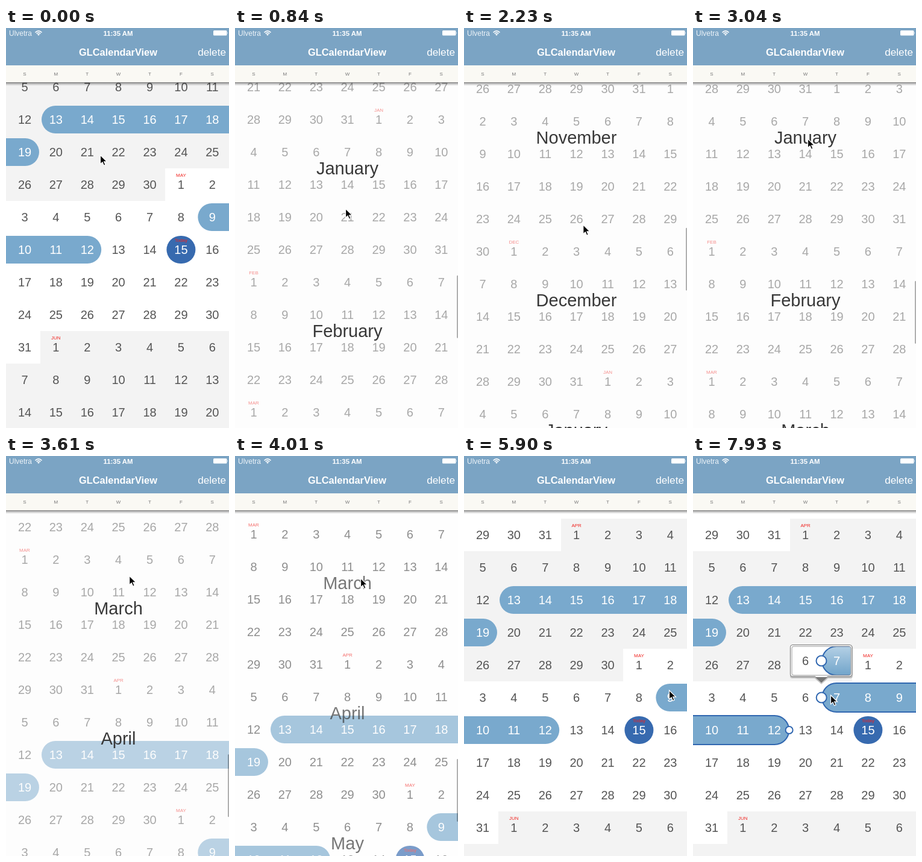
Animation, 370 px wide and 664 px high, one loop 7990 ms. Source, as an HTML page:

```html
<!DOCTYPE html>
<html lang="en">
<head>
<meta charset="utf-8">
<title>Calendar</title>
<style>
html, body { margin: 0; height: 100%; overflow: hidden; background: #fff; }
svg { display: block; width: 370px; height: 664px; font-family: "Liberation Sans", Arial, sans-serif; }
text { white-space: pre; }
.mid { text-anchor: middle; }
.num { font-size: 20px; fill: #555; }
.lit { fill: #fff; }
.tag { font-size: 8px; fill: #f0231f; }
.month { font-size: 29px; fill: #383838; }
.pill { fill: #79a9cd; }
.edit { fill: #79a9cd; stroke: #3067b0; stroke-width: 2; }
.knob { fill: #fff; stroke: #3067b0; stroke-width: 2; }
</style>
</head>
<body>
<svg viewBox="0 0 370 664" xmlns="http://www.w3.org/2000/svg">
  <defs>
    <linearGradient id="shade" x2="0" y2="1">
      <stop offset="0" stop-color="#000" stop-opacity=".5"/>
      <stop offset=".4" stop-color="#000" stop-opacity=".24"/>
      <stop offset="1" stop-color="#000" stop-opacity="0"/>
    </linearGradient>
    <linearGradient id="glass" x2="0" y2="1">
      <stop offset="0" stop-color="#b4d0e5"/>
      <stop offset="1" stop-color="#71a4ca"/>
    </linearGradient>
    <clipPath id="lens"><rect x="-49" y="-24" width="98" height="48" rx="3"/></clipPath>
  </defs>
  <rect width="370" height="664" fill="#fff"/>
  <g id="grid">
    <g id="tint" fill="#f3f3f3" shape-rendering="crispEdges"></g>
    <g id="bars"></g>
    <g id="days"></g>
  </g>
  <rect id="veil" y="90" width="370" height="574" fill="#fcfcfc"/>
  <g id="months"></g>
  <rect id="thumb" x="368" width="2.5" height="104" rx="1.2" fill="#000"/>
  <g id="knobs">
    <circle id="head" class="knob" cy="401"/>
    <circle class="knob" cx="159.6" cy="455" r="6"/>
  </g>
  <g id="loupe">
    <path d="M-49 -25H49Q52 -25 52 -22V25Q52 29 48 29H11L0 39L-11 29H-48Q-52 29 -52 25V-22Q-52 -25 -49 -25Z" fill="#000" opacity=".22"/>
    <path d="M-48 -26.5H47Q51 -26.5 51 -22.5V22Q51 26 47 26H10.500L0 36L-10.500 26H-48Q-51.500 26 -51.500 22V-22.500Q-51.500 -26.500 -48 -26.500Z" fill="#fff" stroke="#777"/>
    <path d="M-10 27H10L0 36Z" fill="#777"/>
    <g clip-path="url(#lens)">
      <rect x="-49" y="-24" width="98" height="48" fill="#fff"/>
      <path d="M60 -24H25A24 24 0 0 0 25 24H60Z" fill="url(#glass)" stroke="#3067b0" stroke-width="2"/>
      <text id="before" class="mid num" x="-26.500" y="7"></text>
      <text id="after" class="mid num lit" x="25.500" y="7"></text>
      <circle class="knob" r="8.500"/>
    </g>
    <rect x="-49" y="-24" width="98" height="48" rx="3" fill="none" stroke="#999"/>
  </g>
  <rect y="90" width="370" height="6" fill="url(#shade)"/>
  <rect width="370" height="63" fill="#7ba4c4"/>
  <rect y="62" width="370" height="28" fill="#faf9f4"/>
  <g id="week" class="mid" font-size="8" fill="#777"></g>
  <g fill="#fff">
    <text x="5" y="13" font-size="12" fill="#edf3f8">Ulvetra</text>
    <g fill="none" stroke="#fff" stroke-width="1.700">
      <path d="M48.500 7.500Q54 2.300 59.500 7.500M50.600 9.500Q54 6.300 57.400 9.500"/>
    </g>
    <path d="M52 10.600Q54 9 56 10.600L54 12.800Z"/>
    <text class="mid" x="186" y="12.500" font-size="11.400" font-weight="bold">11:35 AM</text>
    <rect x="344" y="4" width="22.500" height="8.500" rx="1.500"/>
    <path d="M367.300 6.500Q369 8.200 367.300 10Z"/>
    <text class="mid" x="186" y="46" font-size="16.400" font-weight="bold">GLCalendarView</text>
    <text x="365" y="46" font-size="17.200" text-anchor="end">delete</text>
  </g>
  <path id="arrow" d="M0 0V15L3.500 11.800L6 17.300L8.500 16.200L6.200 10.900H11Z" fill="#000" stroke="#fff" stroke-width="1.200"/>
</svg>
<script>
const LOOP = 7990, ROW = 54, COL = 51.88, LEFT = 5.06;
const NAMES = ["January", "February", "March", "April", "May", "June", "July",
  "August", "September", "October", "November", "December"];
const $ = id => document.getElementById(id);

function add(parent, tag, attrs, text) {
  const el = document.createElementNS("http://www.w3.org/2000/svg", tag);
  for (const key in attrs) el.setAttribute(key, attrs[key]);
  if (text !== undefined) el.textContent = text;
  return parent.appendChild(el);
}
function set(el, attrs) {
  for (const key in attrs) el.setAttribute(key, attrs[key]);
}
const center = col => 31 + COL * col;
const edge = col => LEFT + COL * col;

// Grid space: y = 0 is the middle of the week of May 10, 2015.
const dayText = {}, labels = [];
function buildDays() {
  for (let row = -34; row <= 5; row++) {
    for (let col = 0; col < 7; col++) {
      const n = row * 7 + col;
      const date = new Date(2015, 4, 10 + n), month = date.getMonth(), day = date.getDate();
      const x = center(col), y = row * ROW;
      if (month % 2) {
        const a = col ? Math.round(edge(col)) : 0;
        const b = col < 6 ? Math.round(edge(col + 1)) : 370;
        add($("tint"), "rect", { x: a, y: y - 27, width: b - a, height: ROW });
      }
      const booked = n >= -27 && n <= -21 || n >= -1 && n <= 2;
      const today = n === 5;
      if (today) add($("bars"), "rect", { x: x - 24, y: y - 23, width: 48, height: 46, rx: 23, fill: "#376aaf" });
      dayText[n] = add($("days"), "text", { class: "mid num" + (booked || today ? " lit" : ""), x, y: y + 7 }, day);
      if (today) add($("days"), "text", { class: "mid tag lit", x, y: y - 13 }, "Today");
      if (day === 1) {
        add($("days"), "text", { class: "mid tag", x, y: y - 13 }, NAMES[month].slice(0, 3).toUpperCase());
        labels.push(add($("months"), "text", { class: "mid month", x: 186.5, y: y + 91 }, NAMES[month]));
      }
    }
  }
}

const headPath = (x, r, y) => `M380 ${y - r}H${x + r}A${r} ${r} 0 0 0 ${x + r} ${y + r}H380Z`;
const tailPath = (x, r, y) => `M-10 ${y - r}H${x - r}A${r} ${r} 0 0 1 ${x - r} ${y + r}H-10Z`;

buildDays();
add($("bars"), "path", { class: "pill", d: headPath(59, 23, -4 * ROW) });
add($("bars"), "path", { class: "pill", d: tailPath(55, 23, -3 * ROW) });
const first = add($("bars"), "path"), last = add($("bars"), "path");
[..."SMTWTFS"].forEach((c, i) => add($("week"), "text", { x: center(i), y: 79 }, c));

// [time, value]
const scroll = [[120, 368], [330, 460], [520, 800], [760, 1120], [1000, 1250], [1250, 1282],
  [1430, 1285], [1480, 1292], [1640, 1345], [1850, 1500], [2150, 1600], [2520, 1640],
  [2640, 1630], [2800, 1520], [3040, 1128], [3300, 850], [3600, 715], [3850, 672],
  [4010, 670], [4350, 670], [4450, 655], [4750, 576], [4850, 525], [5030, 455]];
const cover = [[120, 0], [420, 1], [1000, 1], [1280, 0], [1490, 0], [1750, 1], [3910, 1],
  [4225, 0], [4350, 0], [4620, 1], [5330, 1], [5620, 0]];
// [time, x, y]
const pointer = [[120, 156.5, 211], [330, 170, 300], [900, 185, 300], [1430, 198.5, 275],
  [1480, 198.5, 282], [1640, 200, 335], [2520, 196, 320], [2640, 195, 315], [2850, 191, 215],
  [3040, 190.5, 184], [3850, 208.5, 203], [4010, 208.5, 203], [4350, 209.5, 451],
  [4450, 209.5, 436], [4750, 209.5, 356], [4850, 209.5, 320], [5030, 209.5, 318],
  [5330, 209.5, 318], [5900, 340.5, 389], [6370, 340.5, 389], [6780, 320, 399],
  [7190, 320, 399], [7930, 228.5, 397]];

function slope(keys, i, c) {
  if (!keys[i - 1] || !keys[i + 1]) return 0;
  const d = j => (keys[j + 1][c] - keys[j][c]) / (keys[j + 1][0] - keys[j][0]);
  const a = d(i - 1), b = d(i);
  return a * b > 0 ? 2 * a * b / (a + b) : 0;
}
// Monotone cubic through the keys, or straight lines.
function at(keys, t, c = 1, straight = false) {
  if (t <= keys[0][0]) return keys[0][c];
  const i = keys.findIndex(k => k[0] > t) - 1;
  if (i < 0) return keys[keys.length - 1][c];
  const p = keys[i], q = keys[i + 1], h = q[0] - p[0], u = (t - p[0]) / h;
  if (straight) return p[c] + (q[c] - p[c]) * u;
  const w = u * u * (3 - 2 * u), v = 1 - u;
  return p[c] + (q[c] - p[c]) * w + h * u * v * (v * slope(keys, i, c) - u * slope(keys, i + 1, c));
}
const ramp = (t, a, b) => Math.min(1, Math.max(0, (t - a) / (b - a)));

function draw(t) {
  const s = Math.round(at(scroll, t)), k = at(cover, t, 1, true);
  const x = at(pointer, t, 1), y = at(pointer, t, 2);
  const shift = `translate(0 ${s})`;
  set($("grid"), { transform: shift });
  set($("months"), { transform: shift, opacity: k });
  set($("tint"), { opacity: Math.max(0, 1 - 1.5 * k) });
  set($("veil"), { opacity: k / 2 });
  set($("thumb"), { y: 390 + (1292 - s) * 0.1815, opacity: 0.3 * ramp(t, 120, 170) * (1 - ramp(t, 5330, 5580)) });
  set($("arrow"), { transform: `translate(${x} ${y})` });

  const editing = t >= 6200, held = t >= 6740;
  const col = held ? Math.min(6, Math.floor((x - LEFT) / COL)) : 6;
  const start = edge(col);
  const kind = editing ? "edit" : "pill", r = editing ? 24 : 23;
  set(first, { class: kind, d: headPath(start + (editing ? 1.5 : 2), r, -ROW) });
  set(last, { class: kind, d: tailPath(editing ? 159.3 : 158.2, r, 0) });
  for (let c = 4; c < 6; c++) dayText[c - 7].setAttribute("class", "mid num" + (c >= col ? " lit" : ""));
  set($("knobs"), { visibility: editing ? "visible" : "hidden" });
  set($("head"), { cx: start + 0.6, r: held ? 8.5 : 6 });
  set($("loupe"), { visibility: held ? "visible" : "hidden", transform: `translate(${start + 0.4} 340)` });
  $("before").textContent = col + 2;
  $("after").textContent = col + 3;
}

const begin = performance.now();
function tick() {
  draw((performance.now() - begin) % LOOP);
  requestAnimationFrame(tick);
}
tick();
</script>
</body>
</html>
```
